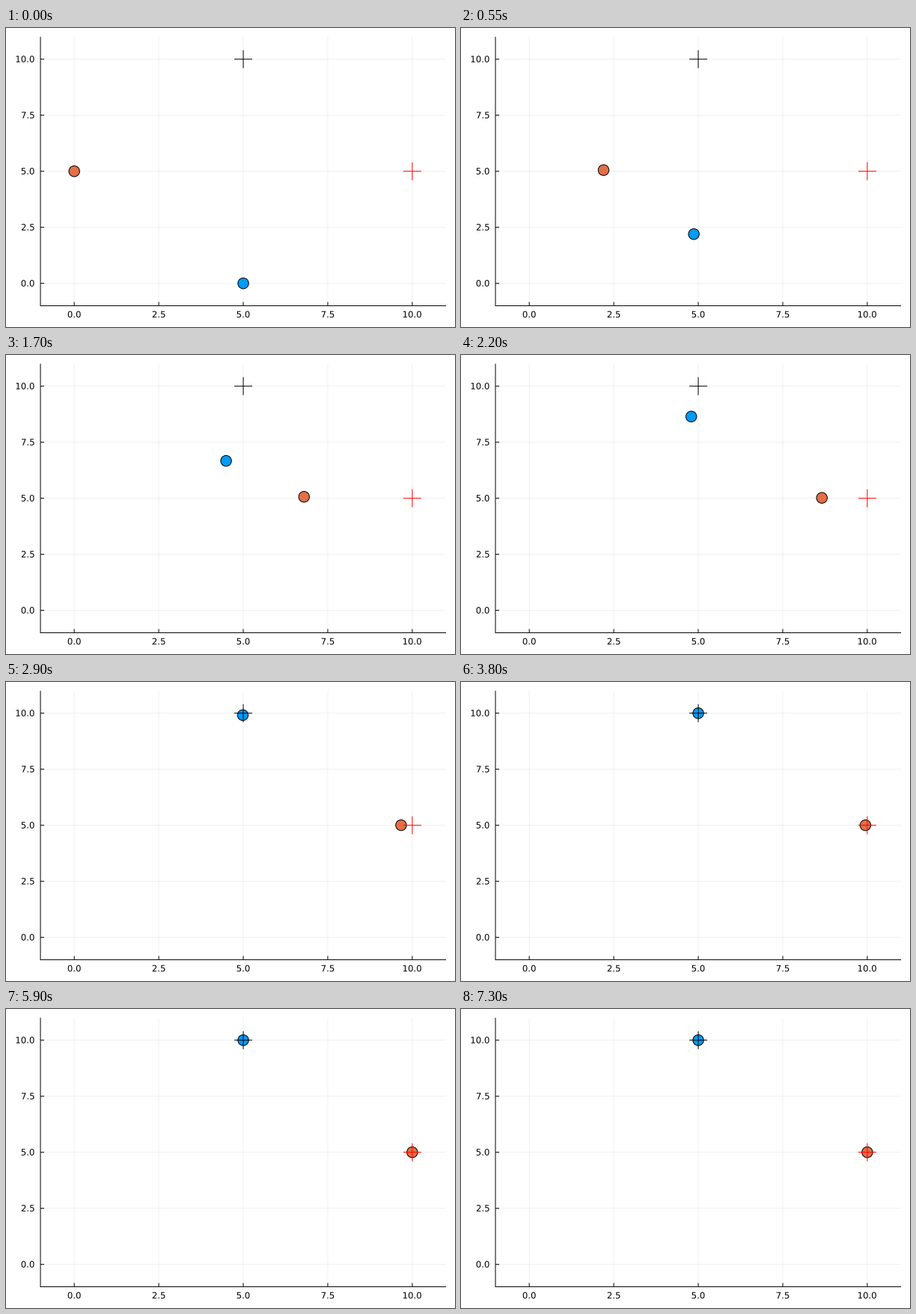
These frames come from a looping animation (600x400 px, 8000 ms). A matplotlib script:

```python
import numpy as np
import matplotlib.pyplot as plt
from matplotlib.animation import FuncAnimation
from matplotlib.patches import Circle, PathPatch
from matplotlib.textpath import TextPath
from matplotlib.transforms import Affine2D

W, H, DPI = 600, 400, 100
PT = 72 / DPI            # points per pixel
FRAMES, INTERVAL = 160, 50
SPEED = 0.2              # top speed, units per frame
PASS = 24                # step at which the agents have cleared each other


def px(x):
    return 91.2 + 45.17 * x


def py(y):
    return 341.6 - 29.99 * y


def approach(r, gain):
    """Distance left after one step: capped speed, then exponential decay."""
    cap = SPEED / gain
    if r >= cap + SPEED:
        return r - SPEED
    if r > cap:
        return cap * np.exp(-gain * (1 - (r - cap) / SPEED))
    return r * np.exp(-gain)


def track(start, goal, gain, heading, bend=(1, 1)):
    """Follow heading(k) while passing, then close in on the goal.

    bend sets how fast each axis closes; (1, 1) is a straight line.
    """
    pos, goal, bend = (np.array(v, float) for v in (start, goal, bend))
    path = [pos]
    for k in range(FRAMES - 1):
        if k < PASS:
            a = heading(k)
            pos = pos + SPEED * np.array([np.cos(a), np.sin(a)])
        else:
            gap = pos - goal
            r = np.hypot(*gap)
            pos = goal + gap * (approach(r, gain) / r) ** bend
        path.append(pos)
    return path


def blue_heading(k):
    return np.pi / 2 + min(0.4, 0.029 * np.exp(0.128 * k))


def orange_heading(k):
    return 0.02 + 0.0007 * k


fig = plt.figure(figsize=(W / DPI, H / DPI), dpi=DPI, facecolor="white")
ax = fig.add_axes([0, 0, 1, 1])
ax.set_xlim(0, W)
ax.set_ylim(H, 0)
ax.axis("off")


def line(x0, y0, x1, y1, color="black", width=1.0, z=1, **kw):
    ax.plot([x0, x1], [y0, y1], color=color, lw=width * PT, zorder=z,
            solid_capstyle="butt", snap=False, **kw)


def label(x, y, value, align):
    """Outline text, placed at fractions of a pixel; align 0.5 centre, 1 right."""
    text = TextPath((0, 0), f"{value:.1f}", size=11.7,
                    prop={"family": "DejaVu Sans"})
    box = text.get_extents()
    shift = box.x0 + align * box.width
    path = Affine2D().translate(-shift, 0).scale(1, -1).translate(x, y)
    ax.add_patch(PathPatch(path.transform_path(text), fc="black", lw=0,
                           snap=False))


left, right, top, bottom = px(-1), px(11), py(11), py(-1)
for v in np.arange(0, 10.1, 2.5):
    x, y = px(v), py(v)
    line(x, top, x, bottom, alpha=0.06)
    line(left, y, right, y, alpha=0.06)
    line(x, bottom, x, bottom - 5, z=2)
    line(left, y, left + 5, y, z=2)
    label(x, 387.3, v, 0.5)
    label(37.6, y + 4.1, v, 1)
line(left, top, left, bottom + 0.5, z=2)
line(left, bottom, right, bottom, z=2)


def cross(x, y, color, arm=12):
    x, y = px(x), py(y)
    line(x - arm, y, x + arm, y, color, z=5)
    line(x, y - arm, x, y + arm, color, z=5)


def dot(color):
    c = Circle((0, 0), 7.2, fc=color, ec="black", lw=PT, zorder=4)
    return ax.add_patch(c)


cross(5, 10, "black")
cross(10, 5, "red")

agents = [
    (dot("#009AFA"), track((5, 0), (5, 10), 0.2, blue_heading)),
    (dot("#E36F47"), track((0, 5), (10, 5), 0.1, orange_heading, (1, 1.5))),
]


def draw(k):
    for disc, path in agents:
        x, y = path[k]
        disc.center = px(x), py(y)
    return [disc for disc, _ in agents]


anim = FuncAnimation(fig, draw, frames=FRAMES, interval=INTERVAL,
                     repeat=True, repeat_delay=0, blit=False)
plt.show()
```
